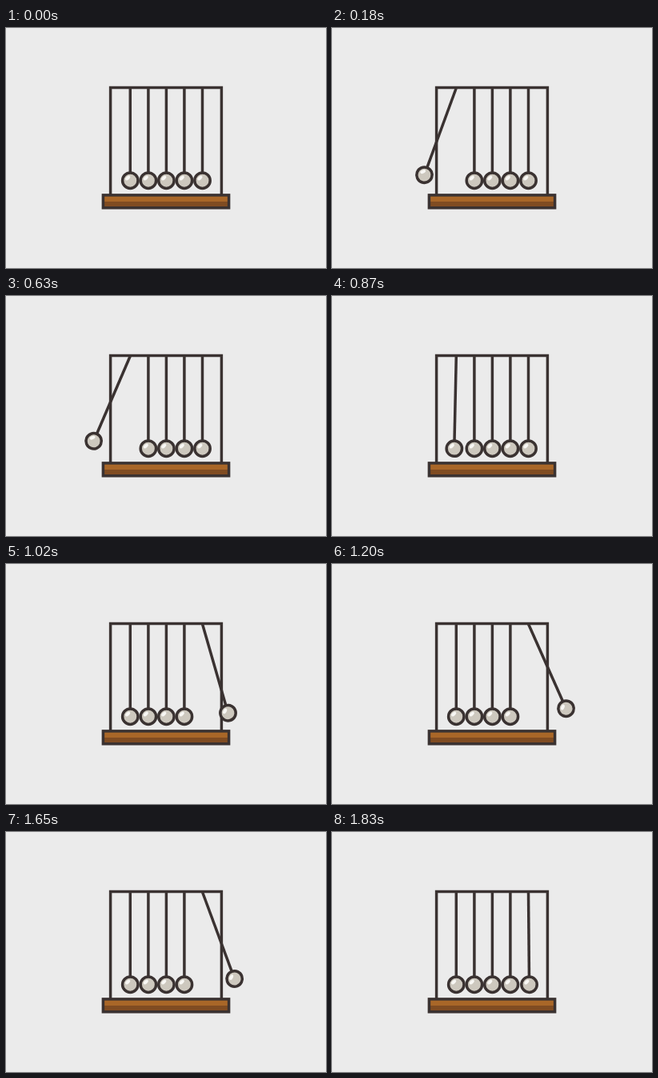
These frames come from a looping animation (400 by 300 pixels, 1.86 s). An HTML page:

```html
<!DOCTYPE html>
<html lang="en">
<head>
<meta charset="utf-8">
<title>Pendulum cradle</title>
<style>
  html, body { margin: 0; width: 100%; height: 100%; overflow: hidden; background: #ebebeb; }
  svg { display: block; width: 400px; height: 300px; }
</style>
</head>
<body>
<svg viewBox="0 0 400 300" fill="none" stroke="#3a3231" stroke-width="3.5">
  <path d="M130.6 209V74.6H269.4V209"/>
  <g id="balls"></g>
  <g stroke="none">
    <path fill="#a96728" d="M121 209H279V217H121Z"/>
    <path fill="#804c22" d="M121 217H279V225H121Z"/>
  </g>
  <rect x="121.4" y="208.9" width="157.2" height="15.9"/>
</svg>
<script>
  const LOOP = 1860, STEP = 30;
  const PIVOT_Y = 75, LENGTH = 115.7;
  const swings = [
    { ball: 0, start: 0, peak: 445, end: 891, angle: 25.4 },
    { ball: 4, start: 891, peak: 1368, end: 1845, angle: -25.5 }
  ];

  const group = document.getElementById('balls');
  const balls = [155.3, 177.9, 200.4, 222.9, 245.5].map(x => {
    const g = document.createElementNS('http://www.w3.org/2000/svg', 'g');
    g.innerHTML = `
      <path d="M0 0V${LENGTH - 9}"/>
      <g transform="translate(0 ${LENGTH})">
        <circle r="9.7" fill="#cdc8be"/>
        <ellipse cx="-3.1" cy="-3.2" rx="3.6" ry="2.1" transform="rotate(-45 -3.1 -3.2)" fill="#f8f7f4" stroke="none"/>
      </g>`;
    group.append(g);
    return { g, x };
  });

  // Soft start, fast rise, long settling: cubic-bezier(.14, 0, .06, 1)
  function ease(x) {
    let lo = 0, hi = 1;
    for (let i = 0; i < 24; i++) {
      const s = (lo + hi) / 2, r = 1 - s;
      const bx = 3 * s * r * r * 0.14 + 3 * s * s * r * 0.06 + s ** 3;
      if (bx < x) lo = s; else hi = s;
    }
    return lo * lo * (3 - 2 * lo);
  }

  // The fall is the rise played backwards.
  function angleAt({ start, peak, end, angle }, t) {
    if (t <= start || t >= end) return 0;
    const x = t < peak ? (t - start) / (peak - start) : (end - t) / (end - peak);
    return angle * ease(x);
  }

  function place({ g, x }, angle) {
    g.setAttribute('transform', `translate(${x} ${PIVOT_Y}) rotate(${angle})`);
  }

  function draw(time) {
    const t = Math.floor((time % LOOP) / STEP) * STEP;
    for (const s of swings) place(balls[s.ball], angleAt(s, t));
  }

  balls.forEach(b => place(b, 0));
  const origin = performance.now();
  function tick() {
    draw(performance.now() - origin);
    requestAnimationFrame(tick);
  }
  tick();
</script>
</body>
</html>
```
